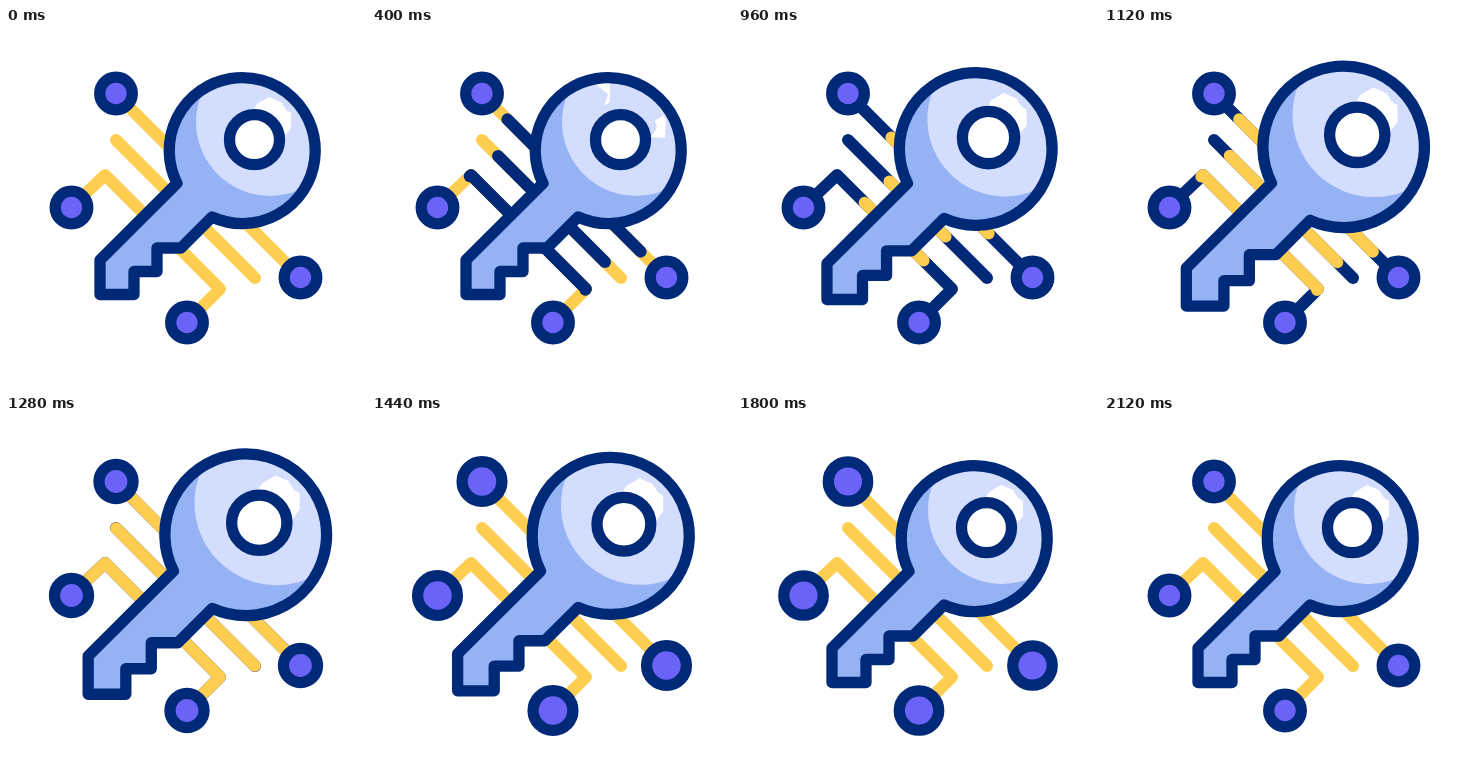
Recreate the animation shown at these times as an HTML page. Size 360x360 px, loop 2.2 s.

```html
<!DOCTYPE html>
<html lang="en">
<head>
<meta charset="utf-8">
<title>Digital key</title>
<style>
  html, body { margin: 0; width: 100%; height: 100%; overflow: hidden; background: #fff; }
  svg { display: block; width: 100vw; height: 100vh; }
</style>
</head>
<body>
<svg viewBox="0 0 360 360">
  <defs>
    <clipPath id="bow"><circle cx="237.8" cy="123.2" r="73"/></clipPath>
    <path id="body" d="M171 155.300L94 232V266.500H128V243.500H151V220H175L206 189A73 73 0 1 0 171 155.300Z"/>
  </defs>
  <g id="wires" fill="none" stroke-width="12" stroke-linecap="round" stroke-linejoin="round"></g>
  <g id="nodes" fill="#6b63f8" stroke="#002a78" stroke-width="11.3"></g>
  <g id="key" stroke-linejoin="round">
    <use href="#body" fill="#94b2f4"/>
    <g clip-path="url(#bow)">
      <circle cx="264" cy="94" r="74" fill="#d3ddfe"/>
      <path id="glare" fill="#fff" d="M246 84L251 76L263 69L275 74L280 82L285 85L285 100L277 110Z"/>
      <path id="sheen" fill="#fff" d="M222 55H238V74L232 78L236 66ZM284 74L294 92L293 110L279 109L285 100L283 92L291 88Z"/>
    </g>
    <use href="#body" fill="none" stroke="#002a78"/>
    <circle cx="248.500" cy="111.700" r="25" fill="#fff" stroke="#002a78"/>
  </g>
</svg>
<script>
const LOOP = 2200, STEP = 40;
const NAVY = '#002a78', YELLOW = '#ffcd50', OUTLINE = 11.3;
const $ = id => document.getElementById(id);

function add(parent, tag, attrs) {
  const el = document.createElementNS('http://www.w3.org/2000/svg', tag);
  for (const name in attrs) el.setAttribute(name, attrs[name]);
  return parent.appendChild(el);
}

// Every wire runs outward from the key.
const routes = [
  'M163 119L124 80',
  'M241 196L280 235',
  'M165 167L110 112',
  'M194 195L249 250',
  'M142 190L99 147L79 166',
  'M170 217L214 261L195 280'
];
const wires = routes.map(d => ({
  base: add($('wires'), 'path', { d }),
  top: add($('wires'), 'path', { d, pathLength: 1 })
}));
const nodes = [[110, 65.5], [65.5, 179.5], [181, 294.5], [294.5, 249.5]]
  .map(([cx, cy]) => add($('nodes'), 'circle', { cx, cy }));

function ease(t, start, end) {
  const u = Math.min(1, Math.max(0, (t - start) / (end - start)));
  return u * u * (3 - 2 * u);
}

function show(el, visible) {
  el.setAttribute('visibility', visible ? 'visible' : 'hidden');
}

function draw(t) {
  const darken = t < 760;
  const grown = darken ? ease(t, 40, 600) : ease(t, 800, 1295);
  const [before, after] = darken ? [YELLOW, NAVY] : [NAVY, YELLOW];
  for (const { base, top } of wires) {
    base.setAttribute('stroke', grown < 1 ? before : after);
    top.setAttribute('stroke', after);
    top.setAttribute('stroke-dasharray', `${grown} 3`);
    show(top, grown > 0 && grown < 1);
  }

  // The key and the nodes grow while their outlines keep their width.
  const scale = 1 + 0.11 * (ease(t, 800, 1160) - ease(t, 1230, 1800));
  $('key').setAttribute('transform',
    `translate(204 157.5) scale(${scale}) translate(-204 -157.5)`);
  $('key').setAttribute('stroke-width', OUTLINE / scale);

  const radius = 16.3 + 4.5 * (ease(t, 1190, 1540) - ease(t, 1650, 2120));
  for (const node of nodes) node.setAttribute('r', radius);

  const glaring = t < 80 || t > 840;
  show($('glare'), glaring);
  show($('sheen'), !glaring);
}

const begin = performance.now();
function tick() {
  const t = (performance.now() - begin) % LOOP;
  draw(Math.floor(t / STEP) * STEP);
  requestAnimationFrame(tick);
}
draw(0);
requestAnimationFrame(tick);
</script>
</body>
</html>
```
